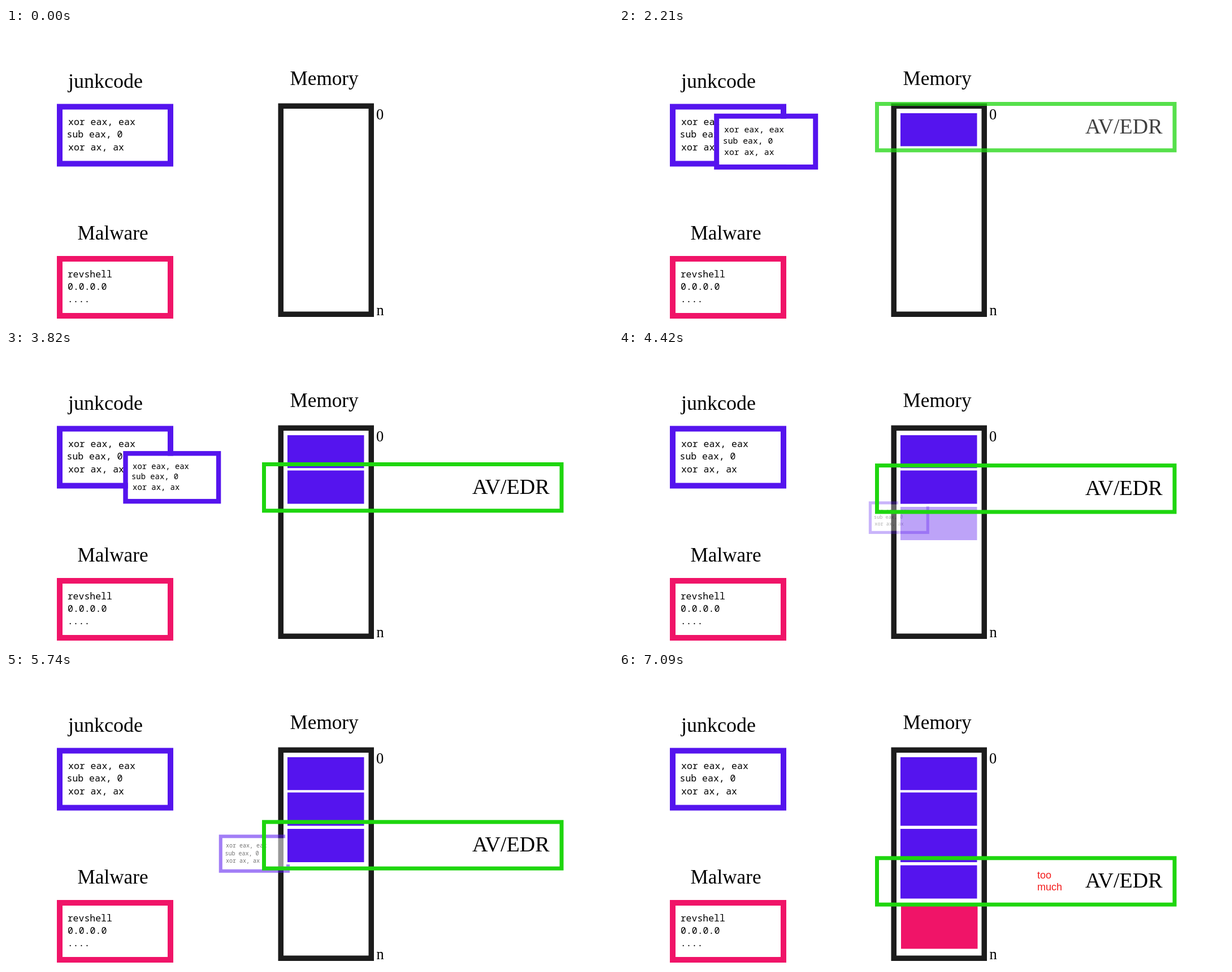
Recreate the animation shown at these times as an HTML page with a canvas. Size 1074x521 px, loop 8760 ms.

```html
<!DOCTYPE html>
<html lang="en">
<head>
<meta charset="utf-8">
<title>Memory fill</title>
<style>
html, body { margin: 0; height: 100%; overflow: hidden; background: #fff; }
canvas { display: block; }
</style>
</head>
<body>
<canvas id="stage" width="1074" height="521"></canvas>
<script>
const ctx = document.getElementById('stage').getContext('2d');
const LOOP = 8760, TICK = 66.9, TRAVEL = 15; // ms, ms, ticks
const BLUE = '#5514ee', PINK = '#f01468', DARK = '#1c1c1c', GREEN = '#1ed60f';
const SERIF = '"Liberation Serif", serif';
const MONO = '500 16.5px "Noto Sans Mono", monospace';
const SANS = '18px "Liberation Sans", sans-serif';

const junk = {
  y: 134.5, color: BLUE,
  lines: [['xor eax, eax', 110], ['sub eax, 0', 107.5], ['xor ax, ax', 110]]
};
const malware = {
  y: 404, color: PINK,
  lines: [['revshell', 108.7], ['0.0.0.0', 109], ['....', 108.7]]
};
// Each move sends a copy of a box to a memory slot; start is in ticks, dy is the vertical travel.
const moves = [
  { start: 7.5, box: junk, dy: -1, slot: [498, 151, 135.5, 58.5] },
  { start: 30, box: junk, dy: 56.5, slot: [498, 213.5, 135.5, 59] },
  { start: 52.5, box: junk, dy: 119, slot: [498, 278, 135.5, 59] },
  { start: 75, box: junk, dy: 180, slot: [498, 342.5, 135.5, 59] },
  { start: 90, box: malware, dy: -4, slot: [499, 410, 135.5, 80.5] }
];
const scannerTops = [131, 199, 262.3, 326.3];

const clamp = v => Math.max(0, Math.min(1, v));
const smooth = v => v * v * (3 - 2 * v);
const slotFade = age => clamp((age - 12.8) / 1.8);

function text(str, x, y, font, color = '#000') {
  ctx.font = font;
  ctx.fillStyle = color;
  ctx.fillText(str, x, y);
}

function frame(x, y, w, h, line, color) {
  ctx.strokeStyle = color;
  ctx.lineWidth = line;
  ctx.strokeRect(x + line / 2, y + line / 2, w - line, h - line);
}

function codeBox({ y, color, lines }) {
  ctx.fillStyle = '#fff';
  ctx.fillRect(100, y + 10, 186, 91);
  frame(90, y, 206, 111, 10, color);
  lines.forEach(([str, x], i) => text(str, x, y + 37.5 + i * 22.3, MONO));
}

function travelingCopy({ box, dy }, age) {
  if (age <= 0 || age > TRAVEL) return;
  const p = age / TRAVEL, scale = 1 - 0.534 * p, cy = box.y + 55.5;
  ctx.save();
  ctx.globalAlpha = clamp(1 - (age - 6) / 11);
  ctx.translate(193 + 336 * p, cy + dy * p);
  ctx.scale(scale, scale);
  ctx.translate(-193, -cy);
  codeBox(box);
  ctx.restore();
}

function memorySlot({ box, slot: [x, y, w, h] }, age) {
  ctx.globalAlpha = slotFade(age);
  frame(x - 4, y - 4, w + 8, h + 8, 4, '#fff');
  ctx.fillStyle = box.color;
  ctx.fillRect(x, y, w, h);
  ctx.globalAlpha = 1;
}

function scanner(ages) {
  let top = scannerTops[0];
  for (let i = 1; i < 4; i++)
    top += (scannerTops[i] - scannerTops[i - 1]) * smooth(clamp((ages[i] - 13) / 4.5));
  ctx.globalAlpha = clamp(ages[1] / 4);
  frame(453, top, 533.5, 89.3, 7, GREEN);
  text('AV/EDR', 825, top + 56, '38px ' + SERIF);
  ctx.globalAlpha = slotFade(ages[4]);
  text('too', 740, 365.5, SANS, '#f31c1c');
  text('much', 740, 387, SANS, '#f31c1c');
  ctx.globalAlpha = 1;
}

function draw(t) {
  const now = Math.floor(t / TICK + 0.2);
  const ages = moves.map(m => now - m.start);
  ctx.fillStyle = '#fff';
  ctx.fillRect(0, 0, 1074, 521);
  text('junkcode', 110, 106, '36px ' + SERIF);
  text('Memory', 502.5, 101, '35.2px ' + SERIF);
  text('Malware', 126.5, 375, '35.2px ' + SERIF);
  text('0', 655, 162, '26.5px ' + SERIF);
  text('n', 655.5, 509, '26.5px ' + SERIF);
  codeBox(junk);
  codeBox(malware);
  frame(481.5, 133.5, 169.5, 378.5, 9.5, DARK);
  moves.forEach((m, i) => travelingCopy(m, ages[i]));
  moves.forEach((m, i) => memorySlot(m, ages[i]));
  scanner(ages);
}

function tick() {
  draw(performance.now() % LOOP);
  requestAnimationFrame(tick);
}
tick();
</script>
</body>
</html>
```
